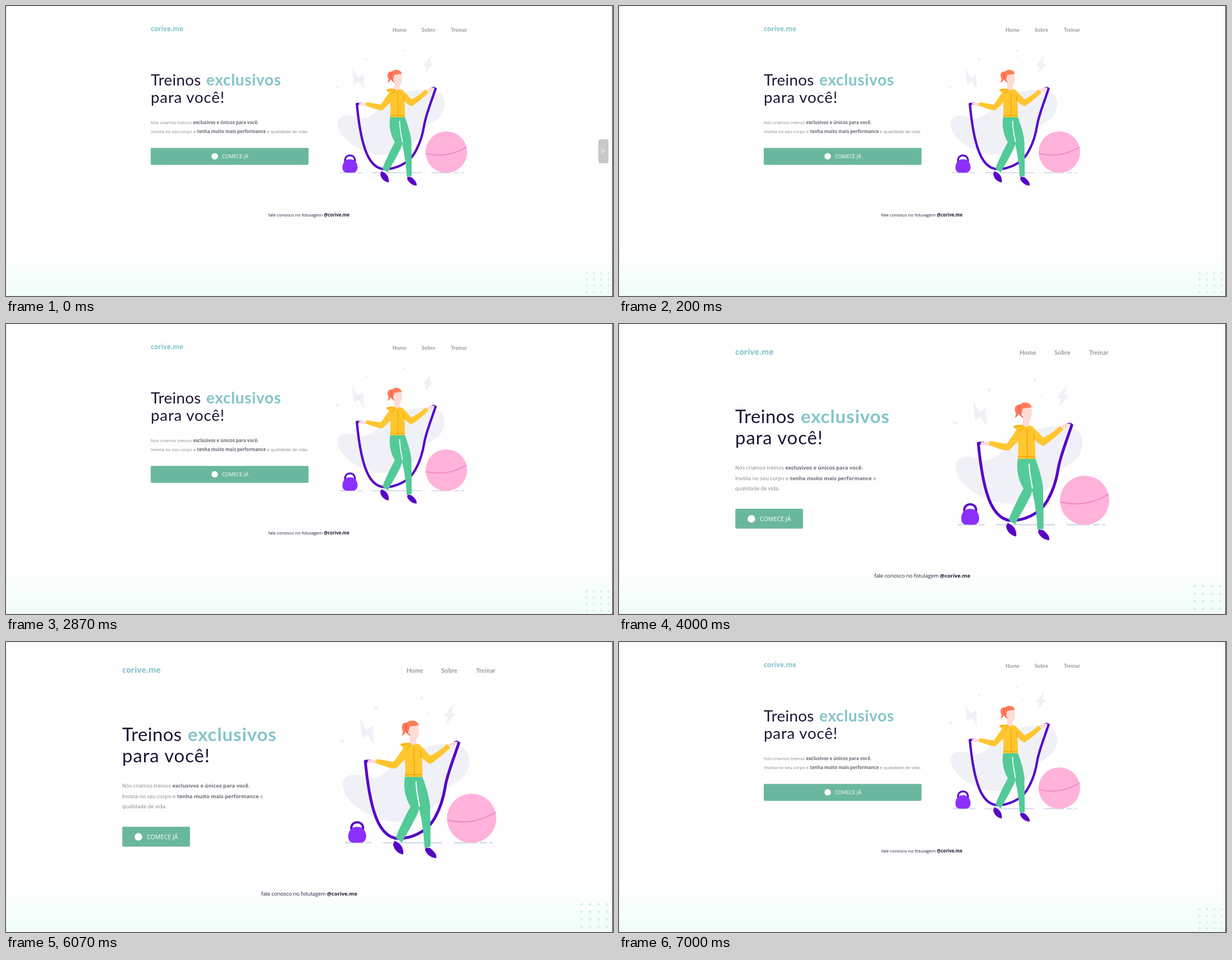
An HTML page for the animation above (7540 ms loop, 1082 by 518 pixels).

```html
<!DOCTYPE html>
<html lang="pt">
<head>
<meta charset="utf-8">
<title>Treinos</title>
<style>
html, body { margin: 0; width: 100%; height: 100%; overflow: hidden; background: #fefefe; }
svg { display: block; width: 100%; height: 100%; }
text { font-family: "Open Sans", sans-serif; fill: #86838f; white-space: pre; }
.logo { font-weight: 700; fill: #84c4cc; }
.nav { font-family: Lato, sans-serif; font-weight: 700; fill: #98959f; letter-spacing: .02em; }
.title { font-family: Lato, sans-serif; fill: #1f1637; letter-spacing: .011em; }
.wide, .hot { letter-spacing: .027em; }
.hot { font-weight: 700; fill: #84c4cc; }
.strong { font-weight: 700; fill: #6f6c79; }
.foot, .foot .strong { fill: #211a35; }
.cta { fill: #fff; }
</style>
</head>
<body>
<svg viewBox="0 0 1082 518" preserveAspectRatio="none">
  <defs>
    <linearGradient id="fade" x1="0" y1="0" x2="0" y2="1">
      <stop offset="0" stop-color="#fefefe"/>
      <stop offset="1" stop-color="#f1fefa"/>
    </linearGradient>

    <g id="art">
      <g fill="#f0f1f6">
        <path d="M600 256C599 239 617 232 638 241C684 256 694 190 748 187C790 178 826 181 826 212C825 246 799 249 786 262C776 288 744 321 690 321C656 318 604 293 600 256Z"/>
        <path d="M631 136L642 157L654 150L656 184L645 166L634 172Z"/>
        <path d="M798 110L780 132L788 134L784 148L802 128L794 126Z"/>
        <circle cx="660" cy="118" r="3"/>
        <circle cx="741" cy="100" r="2.6"/>
        <circle cx="753" cy="127" r="2"/>
        <rect x="596" y="174" width="7" height="6" rx="2"/>
      </g>
      <path d="M604 358.5H638M641 358.5H652M672 358.5H777M798 358.5H839M845 358.5H857M861 358.5H867" stroke="#cbd4e8" stroke-width="1.8"/>

      <circle cx="830" cy="315" r="44" fill="#ffb2da"/>
      <path d="M786.5 318Q832 329 873 304" fill="none" stroke="#ee86c4" stroke-width="2"/>

      <path d="M616 338L615.5 331C617 319 635 319 636.5 331L636 338" fill="none" stroke="#5704c4" stroke-width="4"/>
      <path d="M626 330C637 330 642 339 642 347C642 354 638 358.500 632 358.500H620C613 358.500 610 354 610 347C610 339 615 330 626 330Z" fill="#8c30ff"/>

      <g fill="none" stroke="#5603c8" stroke-width="5" stroke-linecap="round" stroke-linejoin="round">
        <path d="M649 212.5L640.5 213C644 250 649 281 656 303C665 333 680 351 700 351C723 351 748 339 760 321C774 300 780 277 783 258C786 238 797 211 807 181"/>
        <path d="M797 181Q804 176 807.500 180.500" stroke-width="4"/>
      </g>

      <g fill="#ffdbd6">
        <path d="M644 214L646 210.500L662 211L661 217L650 216.500Z"/>
        <path d="M788 183L796 178L806 178L803 181L797 186L790 187Z"/>
        <path d="M720 165H731V185Q725 190 719 184Z"/>
        <path d="M716 148H735C737 162 736 174 728 174C720 173 716 167 716 148Z"/>
      </g>
      <path d="M713 148C714 138 734 137 735.500 149L720 151L716 165C711 159 711 153 713 148Z" fill="#ff7c5c"/>
      <path d="M714 144C705 143 704 153 707 158C708 163 706 166 705 168C713 165 717 155 714 144Z" fill="#ff7c5c"/>
      <path d="M714 146C711 153 713 161 720 167" fill="none" stroke="#f6523d" stroke-width="1.6"/>

      <path d="M728 240H742C750 262 757 284 756 302C756.500 326 757 345 756.500 366L746 367C745 342 741 318 737 300Z" fill="#53ca98"/>
      <path d="M711 240C708 259 711 277 721 294C711 312 701 333 694.500 350L706 358C715 341 733 312 737 297L731 240Z" fill="#53ca98"/>
      <path d="M731 249C731 265 735 280 737 294" fill="none" stroke="#fff" stroke-width="2"/>
      <path d="M693 355L701 360C707 365 709 373 708 379.500C698 378 691 370 690 361Z" fill="#5603c8"/>
      <path d="M748 367L756 368C763 374 768 379 767 386C757 386 750 379 747 372Z" fill="#5603c8"/>

      <g fill="#ffc62f">
        <path d="M711 184L721 182Q726 186 731 181L739 184C741 202 743 222 742 241H711C713 221 710 203 711 184Z"/>
        <path d="M712 185C703 196 697 207 691 214L661 209L659 216C672 221 684 226 695 226C703 218 710 211 715 205Z"/>
        <path d="M735 182C743 188 750 197 756 203C767 198 777 191 786 182L792 189C779 201 769 210 756 218C748 214 742 208 737 203Z"/>
        <path d="M703 183C706 179 716 180 722 181C721 187 716 191 710 191Z"/>
      </g>
      <path d="M703 184C709 183 716 183 720 181M713 192L722 184M727 187L728 241M711 237H742M739 194L740 207" fill="none" stroke="#f1a400" stroke-width="1.5"/>
    </g>
  </defs>

  <rect width="1082" height="518" fill="#fefefe"/>
  <rect y="428" width="1082" height="90" fill="url(#fade)"/>
  <g id="small"></g>
  <g id="large"></g>
  <path d="M0 .5H1082M.5 0V518M0 517.500H1082" stroke="#edf0ef"/>
  <rect x="1081" width="1" height="518" fill="#17171b"/>
  <g id="next">
    <rect x="1056" y="238" width="18" height="43" rx="4" fill="#c8c9c8"/>
    <path d="M1061 254L1070 259.500L1061 265Z" fill="#d8d9d8"/>
  </g>
</svg>
<script>
const LOOP = 7540;
const SWITCHES = [1800, 2870, 4000, 5000, 6070, 7000];
const $ = id => document.getElementById(id);

const text = (cls, size, x, y, body) =>
  `<text class="${cls}" font-size="${size}" x="${x}" y="${y}">${body}</text>`;
const bold = (x, body) => `<tspan class="strong" x="${x}">${body}</tspan>`;

function dots(x, y, dx, dy, r) {
  let out = '';
  for (let i = 0; i < 16; i++) {
    out += `<circle cx="${x + i % 4 * dx}" cy="${y + (i >> 2) * dy}" r="${r}"/>`;
  }
  return `<g fill="#d5f1ec">${out}</g>`;
}

function page(p) {
  const k = p.scale, x = p.left, [bx, by, bw, bh] = p.button;
  return dots(...p.dots) +
    text('logo', 14 * k, x, p.logoY, 'corive.me') +
    ['Home', 'Sobre', 'Treinar'].map((t, i) =>
      text('nav', 10.7 * k, p.nav[i], p.navY, t)).join('') +
    text('title', 33 * k, x, p.title[0],
      `Treinos<tspan class="hot" x="${p.hotX}">exclusivos</tspan>`) +
    text('title wide', 33 * k, x, p.title[1], 'para você!') +
    p.lines.map(([y, body]) => text('', 9.33 * k, x, y, body)).join('') +
    `<rect x="${bx}" y="${by}" width="${bw}" height="${bh}" rx="${2.5 * k}" fill="#6ab79f"/>` +
    `<circle cx="${p.icon[0]}" cy="${p.icon[1]}" r="${6.8 * k}" fill="#fff"/>` +
    text('cta', 10.7 * k, p.cta[0], p.cta[1], 'COMECE JÁ') +
    text('foot', 9.33 * k, p.foot[0], p.foot[1],
      `fale conosco no fotulagem ${bold(p.foot[2], '@corive.me')}`) +
    `<use href="#art" transform="${p.art}"/>`;
}

$('small').innerHTML = page({
  scale: .843, left: 258, logoY: 45, nav: [689, 741, 793], navY: 45.5,
  title: [141.5, 173], hotX: 357,
  lines: [
    [211, 'Nós criamos treinos ' + bold(333.5, 'exclusivos e únicos para você.')],
    [226.5, 'Invista no seu corpo e ' + bold(340.5, 'tenha muito mais performance') +
      '<tspan> e qualidade de vida.</tspan>']
  ],
  button: [258, 253.5, 281.3, 30.2], icon: [372, 268.5], cta: [385, 272.3],
  foot: [467.5, 375.7, 566.5], dots: [1035, 477.5, 13, 11.3, 2],
  art: 'translate(86.1 -4.2) scale(.842)'
});

$('large').innerHTML = page({
  scale: 1, left: 207, logoY: 54.5, nav: [714, 776, 838], navY: 55,
  title: [177, 214.5], hotX: 324,
  lines: [
    [260, 'Nós criamos treinos ' + bold(296.5, 'exclusivos e únicos para você.')],
    [278.7, 'Invista no seu corpo e ' + bold(305, 'tenha muito mais performance') +
      '<tspan> e</tspan>'],
    [297.3, 'qualidade de vida.']
  ],
  button: [207.3, 330, 120.7, 35.5], icon: [236, 348], cta: [251, 351.8],
  foot: [455, 452.5, 572], dots: [1026, 468.5, 15.2, 13.4, 2.4],
  art: 'translate(0 0)'
});

function draw(t) {
  const isLarge = SWITCHES.filter(s => t >= s).length % 2 === 1;
  $('small').style.display = isLarge ? 'none' : '';
  $('large').style.display = isLarge ? '' : 'none';
  $('next').style.opacity = t < 70 ? 1 : t < 135 ? .6 : t < 200 ? .25 : 0;
}

const start = performance.now();
function tick(now) {
  draw(Math.max(0, now - start) % LOOP);
  requestAnimationFrame(tick);
}
draw(0);
requestAnimationFrame(tick);
</script>
</body>
</html>
```
